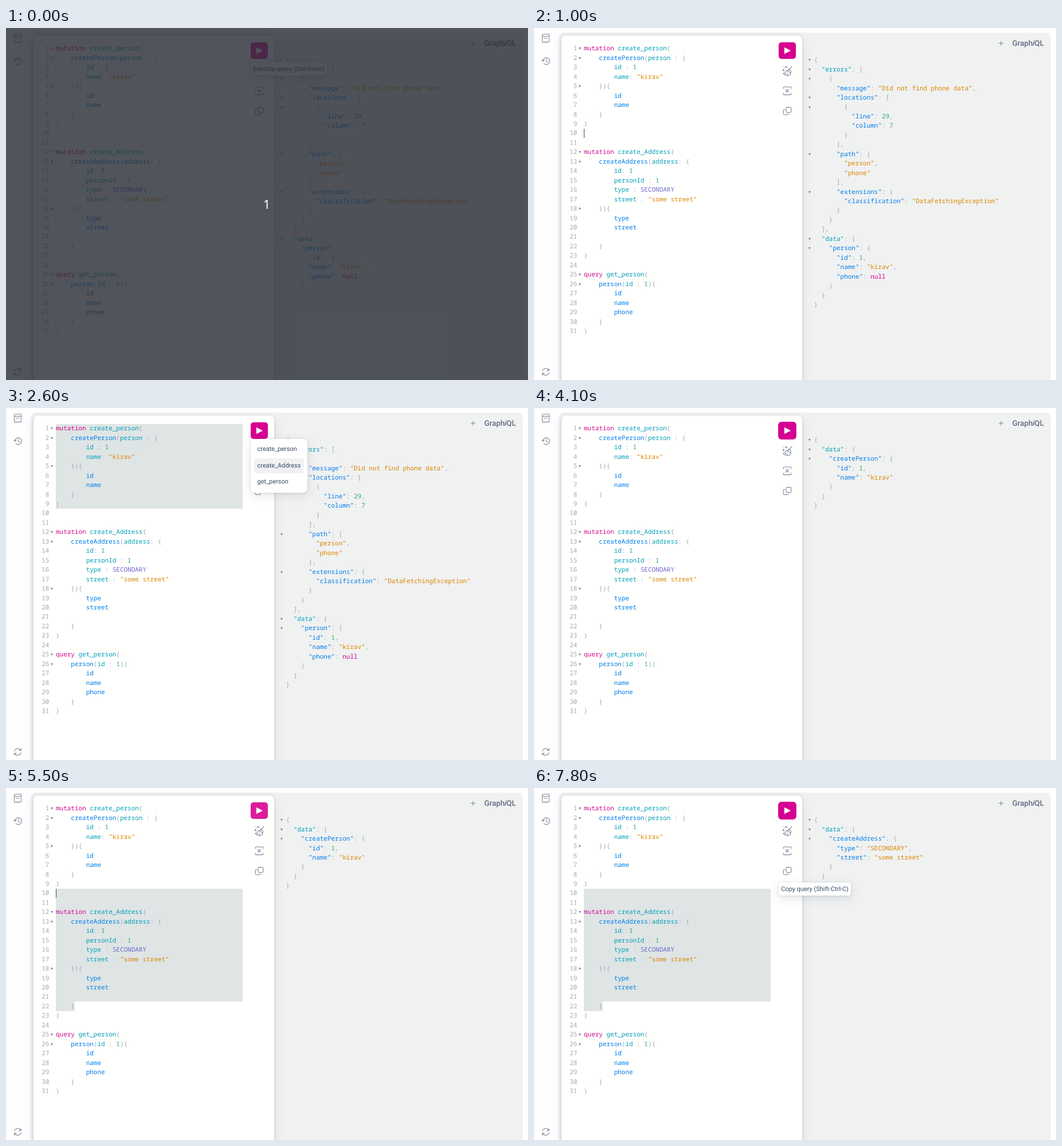
An HTML page that plays this animation: 911 px wide and 615 px high, repeating every 8 s.

```html
<!DOCTYPE html>
<html lang="en">
<head>
<meta charset="utf-8">
<title>GraphiQL session</title>
<style>
  :root {
    --pink: #d60590; --teal: #009fb8; --blue: #007dea; --green: #2bab7d;
    --orange: #db8400; --purple: #6e69ce; --ink: #3b4b68; --mute: #a1a8b5;
    --pop: 0 5px 17px rgba(59,76,106,.13), 0 1px 4px rgba(59,76,106,.1), 0 0 2px rgba(59,76,106,.12);
  }
  html, body { margin: 0; width: 100%; height: 100%; overflow: hidden; background: #fefefe; }
  #stage { position: relative; width: 911px; height: 615px; overflow: hidden;
    font: 10.97px/16px Roboto, sans-serif; color: var(--ink); text-rendering: geometricPrecision; }
  #stage div, #stage svg { position: absolute; box-sizing: border-box; }
  #panel { left: 43px; top: 8px; width: 859px; height: 620px; border-radius: 10px; background: #f0f1f1; }
  #editor { left: 48px; top: 13px; width: 420px; height: 620px; border-radius: 7px; background: #fffffe; box-shadow: var(--pop); }
  #title { right: 21px; top: 18px; font-size: 13.3px; line-height: 19px; font-weight: 500; color: #5f6b82; }
  .code { font: 10.97px/16.45px "Noto Sans Mono", monospace; white-space: pre; color: var(--mute); }
  #query { left: 87px; top: 28.4px; }
  #result { left: 488.5px; top: 48.2px; }
  #nums { left: 48px; top: 28.4px; width: 27.3px; text-align: right; }
  .k { color: var(--pink); } .d { color: var(--teal); } .p { color: var(--blue); }
  .n { color: var(--green); } .s { color: var(--orange); } .e { color: var(--purple); }
  .match .m { color: #d08a14; }
  .fold { width: 0; height: 0; border: 2.6px solid transparent; border-top: 4.4px solid #7c8698; border-bottom: 0; }
  .sel { left: 87px; background: #dfe5e5; }
  #caret { width: 1.3px; height: 16px; background: #3b4656; }
  #run { left: 427px; top: 25px; width: 30px; height: 29px; border-radius: 5px; background: #d60090; }
  #run.hov { background: #dc1c9b; }
  #run.big { box-shadow: 0 0 0 .9px #d60090; }
  .hot { border-radius: 5px; background: rgba(59,75,104,.07); }
  .pop { left: 427px; background: #fff; box-shadow: var(--pop); }
  .tip { height: 23px; padding: 3.5px 4.3px; border-radius: 4px; white-space: nowrap; }
  #menu { top: 54px; width: 99px; height: 94px; border-radius: 7px; }
  #menu div { left: 6px; width: 87px; height: 26.5px; padding: 5px 5.6px; border-radius: 4px; }
  #menu .on { background: #f0f1f3; }
  #veil { inset: 0; background: rgba(38,42,51,.8); }
  #veil div { left: 0; top: 292px; width: 910px; text-align: center; font: 22px/32px "Noto Sans", sans-serif; color: #fff; }
</style>
</head>
<body>
<div id="stage">
  <div id="panel"></div>
  <div id="editor"></div>
  <div id="sel1" class="sel"></div>
  <div id="sel2" class="sel"></div>
  <div id="nums" class="code"></div>
  <div id="query" class="code"></div>
  <div id="caret"></div>
  <div id="result" class="code"></div>
  <div id="foldsL"></div>
  <div id="foldsR"></div>
  <div id="title">Graph<em>i</em>QL</div>
  <div id="doc" class="hot" style="left:5px;top:3px;width:31px;height:29px"></div>
  <div id="tool" class="hot" style="left:428px;width:28px;height:28px"></div>
  <div id="run"></div>
  <svg width="911" height="615" fill="none" stroke="#7a8598" stroke-width="1.05" stroke-linecap="round" stroke-linejoin="round">
    <path d="M437.2 34.2 447.8 39.6 437.2 45Z" fill="#fff" stroke="#fff" stroke-width=".5"/>
    <path d="M811.5 26.7h7M815 23.2v7"/>
    <!-- docs, history, refresh -->
    <path d="M26.4 14.4v9q0 1.2-1.2 1.2h-9.5q-1.2 0-1.2-1.2V12.6q0-1.8 1.8-1.8h10.1v3.6H16.2q-1.7 0-1.7-1.7M18 17.7h5"/>
    <path d="M15.6 57.6a6 6 0 1 1 1.7 4.5M13.6 56.2l2 2 2.2-1.9M21.4 54.2v3.8l2.8 1.7"/>
    <path d="M14.6 599.4a6 6 0 0 1 11-1.4M26.2 595v3.4h-3.4M26.2 602.2a6 6 0 0 1-11 1.5M14.6 606.8v-3.4H18"/>
    <!-- prettify -->
    <path d="M450.2 67.2l-5.4 6.2M441 74.2l7.4 4.4M442 74.6q2-3 4.5-1.4 2.6 1.6 1.4 5.2M441 74.2q-2.2 4-6 5.4 3.8 3.6 9.6 3.8 2.8-1.6 3.8-4.8M438.4 80.9l1.8-2M441.7 82.4l1.6-2.6"/>
    <path d="M435.4 71.6v3.6M433.6 73.4h3.6M440 66.8v3.2M438.4 68.4h3.2M434.7 67.2v.4M443.8 70.2v.4"/>
    <!-- merge -->
    <path d="M435.2 106v-1.6q0-1.4 1.4-1.4h10.8q1.4 0 1.4 1.4v1.6M435.2 113.6v1.6q0 1.4 1.4 1.4h10.8q1.4 0 1.4-1.4v-1.6M439.6 107.4l4.8 4.8M444.4 107.4l-4.8 4.8"/>
    <!-- copy -->
    <rect x="440" y="138.6" width="8.8" height="8.8" rx="1.6"/>
    <path d="M437.8 142.4h-1q-1.6 0-1.6 1.6v5.8q0 1.6 1.6 1.6h5.8q1.6 0 1.6-1.6v-.6"/>
  </svg>
  <div id="tip" class="pop tip"></div>
  <div id="menu" class="pop">
    <div style="top:5px">create_person</div>
    <div style="top:33.5px">create_Address</div>
    <div style="top:61.5px">get_person</div>
  </div>
  <div id="veil"><div>1</div></div>
</div>
<script>
const ROW = 16.45, COL = 6.582, LOOP = 8000;
const $ = id => document.getElementById(id);
const show = (el, on) => { el.style.display = on ? '' : 'none'; };
const paint = (cls, s) => `<span class="${cls}">${s}</span>`;

const query = `mutation create_person{
    createPerson(person : {
        id : 1
        name: "kirav"
    }){
        id
        name
    }
}


mutation create_Address{
    createAddress(address: {
        id: 1
        personId : 1
        type : SECONDARY
        street : "some street"
    }){
        type
        street

    }
}

query get_person{
    person(id : 1){
        id
        name
        phone
    }
}`;

const results = [
  { errors: [{
      message: 'Did not find phone data',
      locations: [{ line: 29, column: 7 }],
      path: ['person', 'phone'],
      extensions: { classification: 'DataFetchingException' } }],
    data: { person: { id: 1, name: 'kirav', phone: null } } },
  { data: { createPerson: { id: 1, name: 'kirav' } } },
  { data: { createAddress: { type: 'SECONDARY', street: 'some street' } } }
].map(r => JSON.stringify(r, null, 2));

const tips = {
  run: [60, 'Execute query (Ctrl-Enter)'],
  pretty: [95, 'Prettify query (Shift-Ctrl-P)'],
  copy: [165, 'Copy query (Shift-Ctrl-C)']
};

function paintQuery(line, i) {
  let html = line.replace(/"[^"]*"|\w+(?=(\s*:)?)/g, (s, colon) =>
    paint(s[0] === '"' ? 's' : /^\d/.test(s) ? 'n' : /^(mutation|query)$/.test(s) ? 'k' :
      /^[A-Z]+$/.test(s) ? 'e' : colon || s.includes('_') ? 'd' : 'p', s));
  if (i === 17 || i === 21) html = html.replace(/[{}]$/, b => paint('m', b));
  return html;
}

function paintJson(line) {
  const top = /^ {2}"/.test(line);
  return line.replace(/"[^"]*"(?=(:)?)|\d+|null/g, (s, colon) =>
    paint(colon ? (top ? 'd' : 'p') : s[0] === '"' ? 's' : s === 'null' ? 'k' : 'n', s));
}

const folds = (lines, x, y) => lines.map((l, i) => /[{[]$/.test(l)
  ? `<div class="fold" style="left:${x}px;top:${y + i * ROW}px"></div>` : '').join('');

const lines = query.split('\n');
$('query').innerHTML = lines.map(paintQuery).join('\n');
$('nums').textContent = lines.map((_, i) => i + 1).join('\n');
$('foldsL').innerHTML = folds(lines, 77.6, 34.4);

// Each step changes part of the state. sel: [first, last full line, columns on the next line]
const steps = [
  [0, { veil: 1, run: 'hov', tip: 'run', menu: null, sel: null, caret: null, res: 0, folds: 1, tool: 0, doc: 0 }],
  [100, { veil: 0 }],
  [300, { run: '', tip: null }],
  [400, { tip: 'pretty' }],
  [800, { tip: null }],
  [1000, { caret: [10, 0] }],
  [1100, { caret: [8, 0], sel: [8, 9, 0] }],
  [1200, { caret: [5, 0], sel: [5, 9, 0] }],
  [1300, { caret: [2, 0], sel: [2, 9, 0] }],
  [1400, { caret: [1, 0], sel: [1, 9, 0] }],
  [1500, { doc: 1 }],
  [1700, { doc: 0 }],
  [2000, { run: 'hov' }],
  [2100, { caret: null }],
  [2300, { menu: -1 }],
  [2500, { run: '', menu: 0 }],
  [2600, { menu: 1 }],
  [3000, { menu: 0 }],
  [3400, { run: 'big', menu: null, sel: null, res: 1, folds: 0 }],
  [3800, { folds: 1, tool: 1 }],
  [3900, { tool: 2 }],
  [4000, { tool: 3 }],
  [4100, { tool: 0 }],
  [5200, { run: '', caret: [22, 5] }],
  [5300, { caret: [16, 0], sel: [16, 21, 5] }],
  [5400, { caret: [10, 0], sel: [10, 21, 5] }],
  [5500, { run: 'hov' }],
  [6000, { caret: null }],
  [6200, { run: '', tool: 1 }],
  [6300, { tool: 0 }],
  [6600, { run: 'hov', caret: [10, 0] }],
  [6800, { caret: null, menu: -1 }],
  [6900, { run: '', menu: 0 }],
  [7000, { menu: 1 }],
  [7400, { run: 'big', menu: null, res: 2 }],
  [7500, { tool: 1 }],
  [7600, { tool: 2 }],
  [7700, { tool: 3 }],
  [7800, { tool: 0, tip: 'copy' }]
];
let state = {};
const states = steps.map(([at, change]) => [at, state = { ...state, ...change }]);

const lineTop = n => 28 + (n - 1) * ROW;
function box(el, top, height, width) {
  Object.assign(el.style, { top: top + 'px', height: height + 'px', width: width + 'px' });
}

function render(s) {
  show($('veil'), s.veil);
  show($('doc'), s.doc);
  $('run').className = s.run;

  show($('tool'), s.tool);
  $('tool').style.top = 26 + s.tool * 35 + 'px';

  show($('tip'), s.tip);
  if (s.tip) {
    const [y, text] = tips[s.tip];
    $('tip').style.top = y + 'px';
    $('tip').textContent = text;
  }

  show($('menu'), s.menu !== null);
  [...$('menu').children].forEach((item, i) => { item.className = i === s.menu ? 'on' : ''; });

  const [a, b, cols] = s.sel || [1, 0, 0];
  box($('sel1'), lineTop(a), (b - a + 1) * ROW, 326);
  box($('sel2'), lineTop(b + 1), ROW, cols * COL);

  show($('caret'), s.caret);
  if (s.caret) {
    $('caret').style.top = lineTop(s.caret[0]) + 'px';
    $('caret').style.left = 87 + s.caret[1] * COL + 'px';
  }
  $('query').classList.toggle('match', !!s.caret && s.caret[0] === 22);

  const out = results[s.res].split('\n');
  $('result').innerHTML = out.map(paintJson).join('\n');
  $('foldsR').innerHTML = s.folds ? folds(out, 478.8, 54.3) : '';
}

let shown;
function tick() {
  const t = performance.now() % LOOP;
  const now = states.filter(([at]) => at <= t).pop()[1];
  if (now !== shown) render(shown = now);
  requestAnimationFrame(tick);
}
tick();
</script>
</body>
</html>
```
